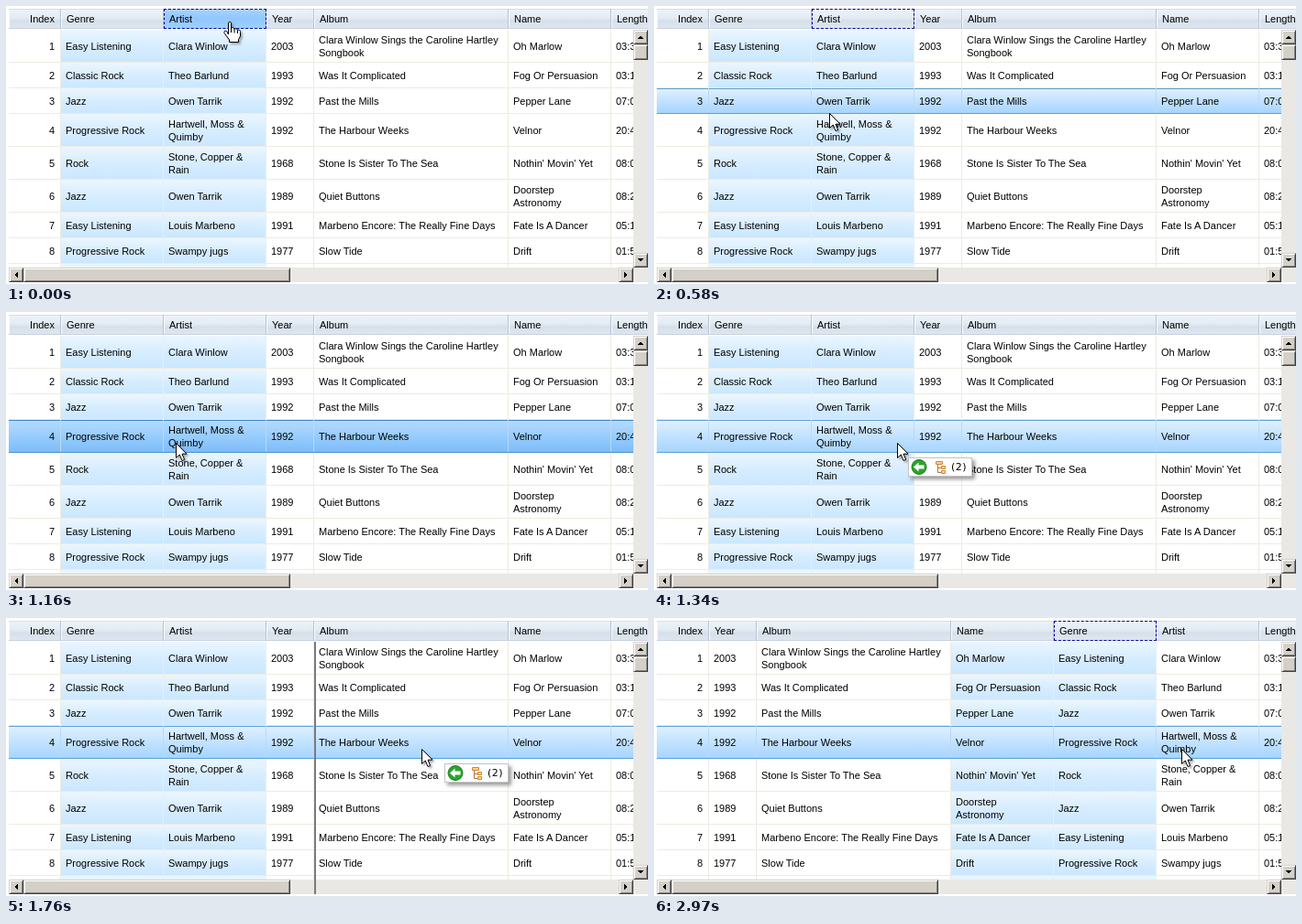
An HTML page for the animation above (4.83 s loop, 700 px wide and 304 px high).

```html
<!DOCTYPE html>
<html lang="en">
<head>
<meta charset="utf-8">
<title>Column drag and drop</title>
<style>
html, body { margin: 0; width: 100%; height: 100%; overflow: hidden; background: #fff; }
body { font: 11px/14px "Liberation Sans", Arial, sans-serif; color: #000; }
#stage { position: relative; width: 700px; height: 304px; overflow: hidden; }
#stage div, #stage svg { position: absolute; box-sizing: border-box; }
#stage svg { overflow: visible; }

.grid { inset: 0; }
.head {
  left: 3px; top: 3px; width: 697px; height: 22px; overflow: hidden;
  background: linear-gradient(#edf3f9, #e3ebf3 45%, #d6e0ea 60%, #dfe7ef);
  box-shadow: inset 0 1px #d5dde6, inset 0 -1px #c8d2dd;
}
.head div { top: 0; height: 22px; padding: 4px 6px; border-right: 1px solid #b6c2cf; white-space: nowrap; }
.head div::before { content: ""; position: absolute; inset: 1px auto 1px 0; width: 1px; background: #f9fbfd; }
.head .focus::after { content: ""; position: absolute; inset: 0 -1px 0 0; border: 1px dashed #000099; }
.head .hover { background: linear-gradient(#a8d4ff, #91c7fd 50%, #9fd0ff); }
.body { left: 3px; top: 26px; width: 681px; height: 260px; overflow: hidden; }
.row { left: 0; width: 681px; border-bottom: 1px solid #eeebe1; }
.cell {
  top: 0; height: 100%; padding-left: 5px; display: flex; align-items: center;
  white-space: pre; border-right: 1px solid #eeebe1;
}
.num { justify-content: flex-end; padding-right: 6px; text-align: right; }
.tint { background: linear-gradient(#ebf6ff, #d7edff 50%, #cbe7ff); border-right-color: #e6f0f6; }
.row.hot { background: linear-gradient(#e0f1ff, #c3e2ff 50%, #a6d5ff); border-bottom-color: #5c9fd6; box-shadow: inset 0 1px #5c9fd6; }
.row.down { background: linear-gradient(#b5dbff, #98cdfd 50%, #7dbcfa); border-bottom-color: #4a90cc; box-shadow: inset 0 1px #3d86c4; }
.hot .cell, .down .cell { background: none; border-right-color: #b9daf5; }

.track { background: #eae8e4; }
.btn { background: #d4d0c8; border: 1px solid; border-color: #d4d0c8 #404040 #404040 #d4d0c8; box-shadow: inset 1px 1px #fff, inset -1px -1px #808080; }
#line { top: 26px; width: 2px; height: 276px; background: #7b7b7b; }
#badge { top: 159px; width: 70px; height: 21px; background: #fff; border: 1px solid #c4c4c4; box-shadow: 3px 3px 4px rgba(0, 0, 0, .4); }
#badge svg { left: -1px; top: -1px; }
#badge div { left: 46px; top: 3px; font: 11px/14px "DejaVu Sans", sans-serif; letter-spacing: .5px; }
#arrow, #hand { left: 0; top: 0; filter: drop-shadow(2px 2px 1px rgba(0, 0, 0, .3)); }
</style>
</head>
<body>
<div id="stage">
  <div id="grids"></div>
  <div id="bars"></div>
  <div id="line"></div>
  <div id="badge">
    <svg width="70" height="21">
      <circle cx="12" cy="10.5" r="8" fill="#2ba52b" stroke="#167d1c"/>
      <path d="M6 10.5L11.5 5.5V8.5H17.500V12.500H11.500V15.500Z" fill="#fff"/>
      <path d="M32.500 8V16.500H36M32.500 11.500H36" fill="none" stroke="#a07a50"/>
      <g fill="#fbd38a" stroke="#d6862c">
        <path d="M30.500 4.500H37.500V7.500H30.500Z"/>
        <path d="M36.500 9.500H40.500V12.500H36.500ZM36.500 14.500H40.500V17.500H36.500Z"/>
      </g>
    </svg>
    <div>(2)</div>
  </div>
  <svg id="arrow" width="14" height="22">
    <path d="M.5 .5V16.500L4.300 13L7 19.500L9.600 18.400L7 12.200H12Z" fill="#fff" stroke="#000"/>
  </svg>
  <svg id="hand" width="20" height="24">
    <path d="M-1.500 13V.2Q0-2 1.500 .2V6Q4 4.500 5 7Q7.500 5.700 8.500 8.200Q11.500 7.300 11.500 10.500V15L9.500 18.500V21.500H-.5V19L-6 11.500Q-6.500 8.300-3.500 9.500Z" fill="#fff" stroke="#000"/>
    <path d="M1.500 6V11M5 7V11.500M8.500 8.200V12" stroke="#000"/>
  </svg>
</div>
<script>
const LOOP = 4830, STEP = 60;
const $ = id => document.getElementById(id);

const columns = {
  Index: [57, "1|2|3|4|5|6|7|8"],
  Genre: [112, "Easy Listening|Classic Rock|Jazz|Progressive Rock|Rock|Jazz|Easy Listening|Progressive Rock"],
  Artist: [112, "Clara Winlow|Theo Barlund|Owen Tarrik|Hartwell, Moss &\nQuimby|Stone, Copper &\nRain|Owen Tarrik|Louis Marbeno|Swampy jugs"],
  Year: [52, "2003|1993|1992|1992|1968|1989|1991|1977"],
  Album: [212, "Clara Winlow Sings the Caroline Hartley\nSongbook|Was It Complicated|Past the Mills|The Harbour Weeks|Stone Is Sister To The Sea|Quiet Buttons|Marbeno Encore: The Really Fine Days|Slow Tide"],
  Name: [112, "Oh Marlow|Fog Or Persuasion|Pepper Lane|Velnor|Nothin' Movin' Yet|Doorstep\nAstronomy|Fate Is A Dancer|Drift"],
  Length: [60, "03:35|03:13|07:05|20:42|08:02|08:21|05:14|01:53"]
};
const heights = [36, 28, 28, 36, 36, 36, 28, 28, 28];
const tops = heights.map((_, i) => heights.slice(0, i).reduce((a, b) => a + b, 0));

function box(parent, cls, style, text = "") {
  const el = document.createElement("div");
  el.className = cls;
  for (const k in style) el.style[k] = style[k] + "px";
  el.textContent = text;
  return parent.appendChild(el);
}

function makeGrid(order, tinted) {
  const root = box($("grids"), "grid", {});
  const head = box(root, "head", {}), body = box(root, "body", {});
  const rows = heights.map((height, i) => box(body, "row", { top: tops[i], height }));
  const heads = {};
  let left = 0;
  for (const name of order) {
    const [width, list] = columns[name], texts = list.split("|");
    const kind = (name === "Index" ? " num" : "") + (tinted.includes(name) ? " tint" : "");
    heads[name] = box(head, name === "Index" ? "num" : "", { left, width }, name);
    rows.forEach((row, i) => box(row, "cell" + kind, { left, width }, texts[i] || ""));
    left += width;
  }
  return { root, rows, heads };
}

const before = makeGrid(["Index", "Genre", "Artist", "Year", "Album", "Name", "Length"], ["Genre", "Artist"]);
const after = makeGrid(["Index", "Year", "Album", "Name", "Genre", "Artist", "Length"], ["Name", "Genre"]);
after.rows[3].classList.add("hot");
after.heads.Genre.classList.add("focus");

function button(left, top, turn) {
  box($("bars"), "btn", { left, top, width: 16, height: 16 }).innerHTML =
    `<svg width="14" height="14" style="left:0;top:0"><path d="M3.500 9L7 5.500L10.500 9Z" transform="rotate(${turn} 7 7)" shape-rendering="crispEdges"/></svg>`;
}
box($("bars"), "track", { left: 684, top: 26, width: 16, height: 276 });
box($("bars"), "track", { left: 3, top: 286, width: 681, height: 16 });
box($("bars"), "btn", { left: 684, top: 42, width: 16, height: 17 });
box($("bars"), "btn", { left: 19, top: 286, width: 291, height: 16 });
button(684, 26, 0);
button(684, 270, 180);
button(3, 286, -90);
button(668, 286, 90);

const show = (el, on) => { el.style.visibility = on ? "visible" : "hidden"; };
const move = (el, x, y) => { el.style.transform = `translate(${Math.round(x)}px, ${Math.round(y)}px)`; };
const steps = (t, from, max) => Math.min(max, Math.floor((t - from) / STEP));

function lerp(points, n) {
  let [a, va] = points[0];
  for (const [b, vb] of points) {
    if (n <= b) return b === a ? vb : va + (vb - va) * (n - a) / (b - a);
    [a, va] = [b, vb];
  }
  return va;
}

// Pointer tip: header to row, then sideways with the dragged columns.
function pointer(t) {
  if (t < 400) return [244, 18];
  if (t < 1160) {
    const rest = 1 - (steps(t, 400, 6) + 1) / 7;
    return [185 + 59 * rest ** 2.7, 143 - 125 * rest ** 1.85];
  }
  const n = steps(t, 1160, 18);
  return [n < 10 ? 185 + 26.8 * n : 575 - 122 * (1 - (n - 10) / 8) ** 1.77, 143];
}

function render(t) {
  const [x, y] = pointer(t);
  const drag = steps(t, 1160, 18), dropped = t >= 2970;
  const dragging = drag >= 2 && !dropped;

  show(before.root, !dropped);
  show(after.root, dropped);
  before.heads.Artist.className = (t < 1160 ? "focus" : "") + (t < 400 ? " hover" : "");
  before.rows.forEach((row, i) => {
    const over = y >= 26 + tops[i] && y < 26 + tops[i] + heights[i];
    const pressed = drag === 0 || drag === 1;
    row.className = "row" + (over ? pressed ? " down" : " hot" : "");
  });

  show($("hand"), t < 400);
  show($("arrow"), t >= 400);
  move($("hand"), x, y);
  move($("arrow"), x, y);

  show($("badge"), dragging);
  move($("badge"), x + lerp([[6, 12], [10, 25], [17, 21], [18, 16]], drag), 0);
  show($("line"), dragging && x >= 336);
  move($("line"), x < 548 ? 336 : 548, 0);
}

const start = performance.now();
function tick() {
  render((performance.now() - start) % LOOP);
  requestAnimationFrame(tick);
}
tick();
</script>
</body>
</html>
```
